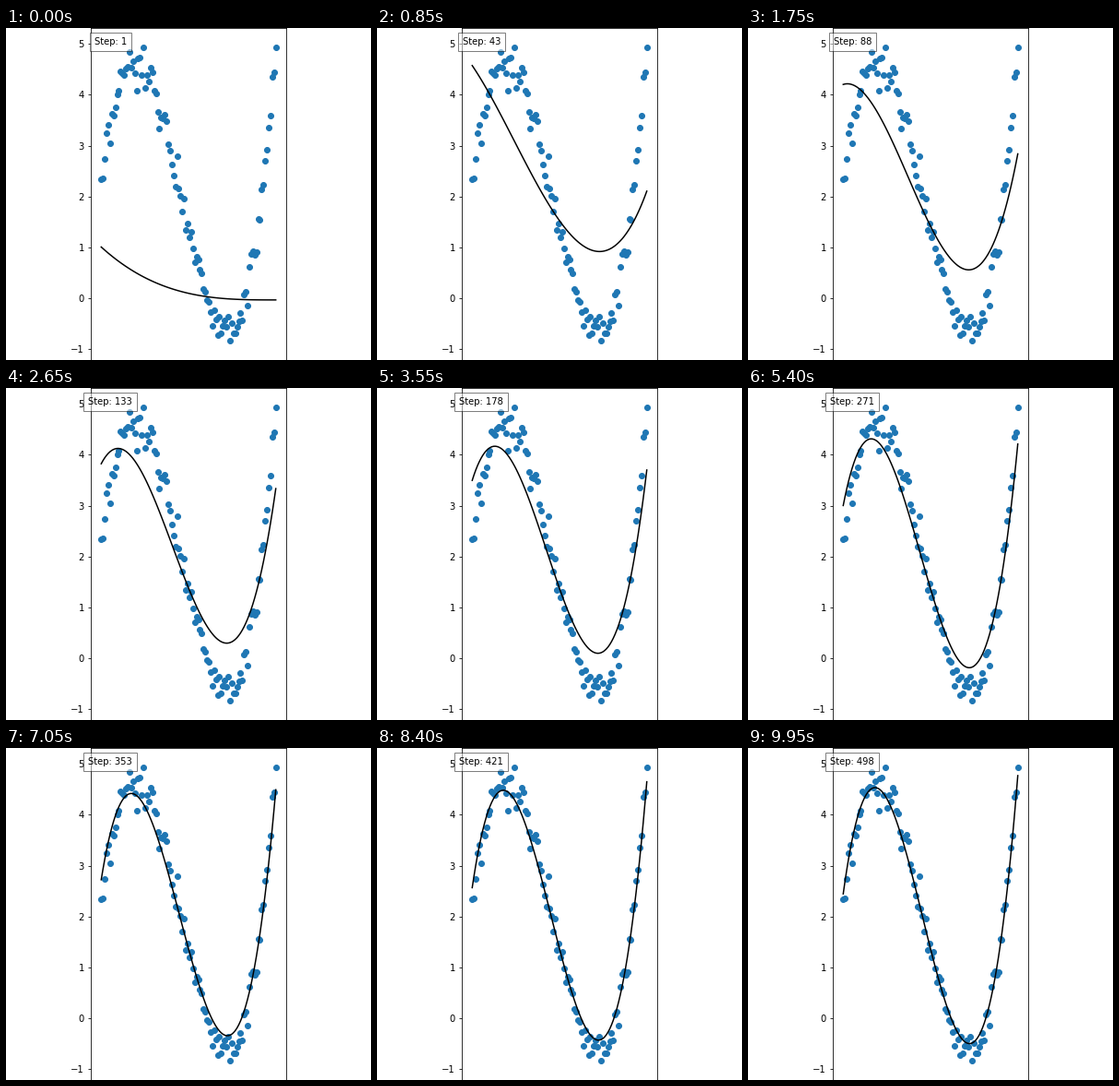
Recreate the animation shown at these times as a matplotlib script. Size 396 by 360 pixels, loop 10000 ms.

```python
import numpy as np
import matplotlib.pyplot as plt
from matplotlib.animation import FuncAnimation

W, H, DPI = 396, 360, 72
FRAMES, INTERVAL = 200, 50
STEPS_PER_FRAME = 2.5
RATE = 0.15

# Stage geometry in pixels, y measured downwards
LEFT, RIGHT, TOP, BOTTOM = 92, 304, 0, 368
X_MID, X_UNIT = 198, 94.7
Y_ZERO, Y_UNIT = 293.2, 55.2


def to_x(px):
    return (px - X_MID) / X_UNIT


def to_y(px):
    return (Y_ZERO - px) / Y_UNIT


# A cubic with Gaussian noise
x = np.linspace(-1, 1, 100)
powers = np.vander(x, 4, increasing=True)
noise = np.random.RandomState(0).normal(scale=0.2, size=len(x))
y = powers @ [1.445, -7.16, 1.98, 8.59] + noise


def descend(start, steps):
    """Cubic weights after each step of gradient descent on squared error."""
    history = [np.array(start)]
    for _ in range(steps):
        w = history[-1]
        gradient = 2 * powers.T @ (powers @ w - y) / len(x)
        history.append(w - RATE * gradient)
    return history


weights = descend([0.10, -0.39, 0.39, -0.13], int(FRAMES * STEPS_PER_FRAME))

fig = plt.figure(figsize=(W / DPI, H / DPI), dpi=DPI, facecolor="white")
ax = fig.add_axes([LEFT / W, 1 - BOTTOM / H,
                   (RIGHT - LEFT) / W, (BOTTOM - TOP) / H])
ax.set_xlim(to_x(LEFT), to_x(RIGHT))
ax.set_ylim(to_y(BOTTOM), to_y(TOP))
ax.set_xticks([])
ax.set_yticks(range(-1, 6))

ax.scatter(x, y, color="#1f77b4")
curve, = ax.plot([], [], color="black", lw=1.5)
label = ax.text(to_x(113.2), to_y(18), "", ha="center", fontsize=10,
                bbox=dict(facecolor="white", alpha=0.5, pad=5))


def update(frame):
    done = int(frame * STEPS_PER_FRAME)
    curve.set_data(x, powers @ weights[done])
    label.set_text(f"Step: {done + 1}")
    return curve, label


anim = FuncAnimation(fig, update, frames=FRAMES, interval=INTERVAL,
                     repeat=True, repeat_delay=0)
plt.show()
```
